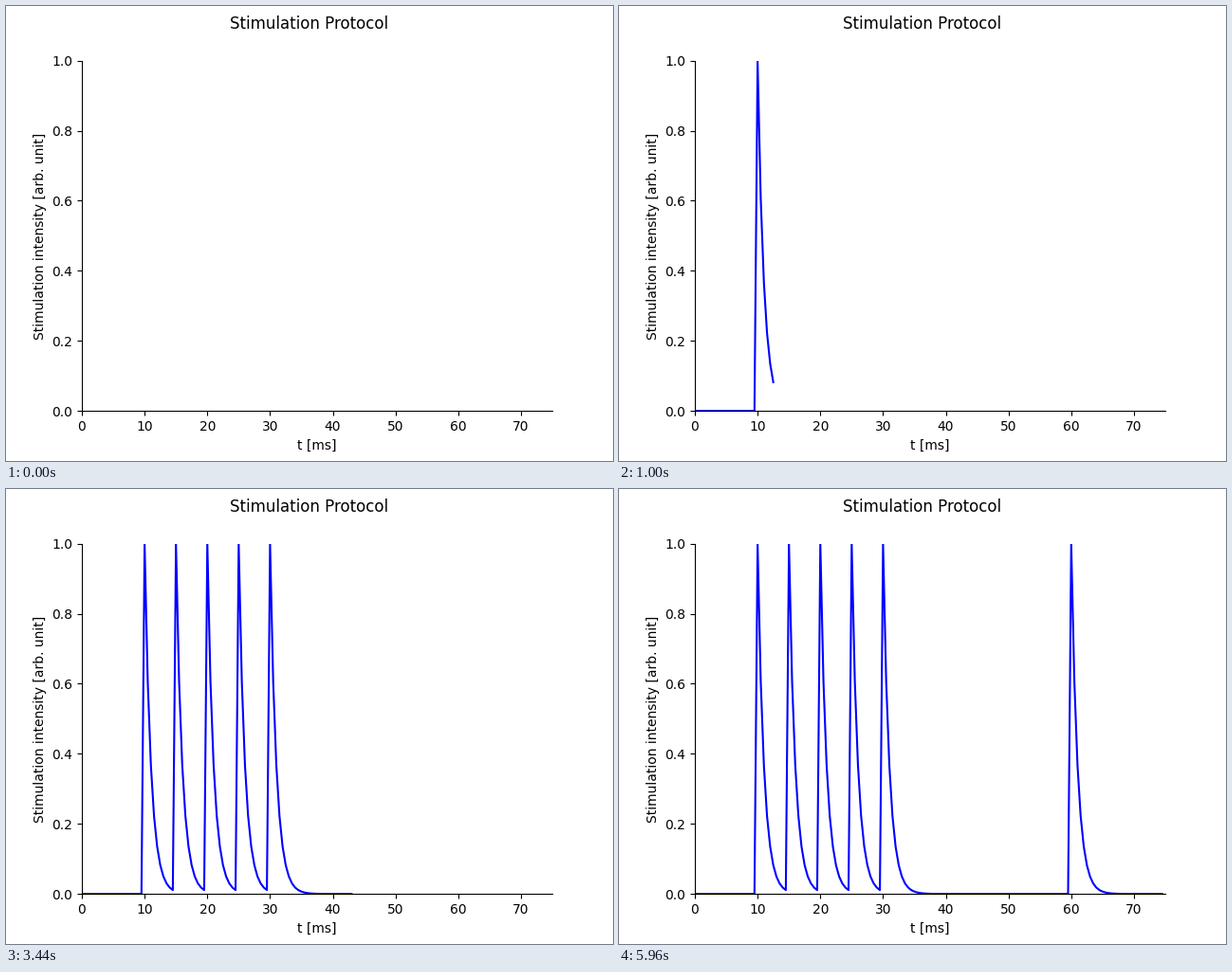
Animation of 640x480 px, one loop 6 s. Source, as a matplotlib script:

```python
import numpy as np
import matplotlib.pyplot as plt
from matplotlib.animation import FuncAnimation

FRAMES = 150
INTERVAL = 40
DT = 0.5
TAU = 1.0
PULSES = (10, 15, 20, 25, 30, 60)
FLASH = "#242424"

plt.rcParams["font.family"] = "DejaVu Sans"


def stimulus(t):
    """Each pulse resets the intensity to 1, which then decays."""
    s = np.zeros_like(t)
    for start in PULSES:
        on = t >= start
        s[on] = np.exp(-(t[on] - start) / TAU)
    return s


t = np.arange(FRAMES) * DT
s = stimulus(t)

fig, ax = plt.subplots(figsize=(6.4, 4.8), dpi=100)
fig.suptitle("Stimulation Protocol")
ax.set(xlim=(0, 75), ylim=(0, 1), xlabel="t [ms]",
       ylabel="Stimulation intensity [arb. unit]")
ax.spines[["top", "right"]].set_visible(False)
line, = ax.plot([], [], color="b", lw=1.5)


def update(i):
    # the background blinks dark for a single frame
    back = FLASH if i == 1 else "white"
    fig.set_facecolor(back)
    ax.set_facecolor(back)
    line.set_data(t[:i + 1], s[:i + 1])
    # a lone first point leaves no mark
    line.set_visible(i > 0)
    return line,


anim = FuncAnimation(fig, update, frames=FRAMES, interval=INTERVAL,
                     init_func=lambda: update(0), repeat=True,
                     repeat_delay=0, blit=False)
plt.show()
```
